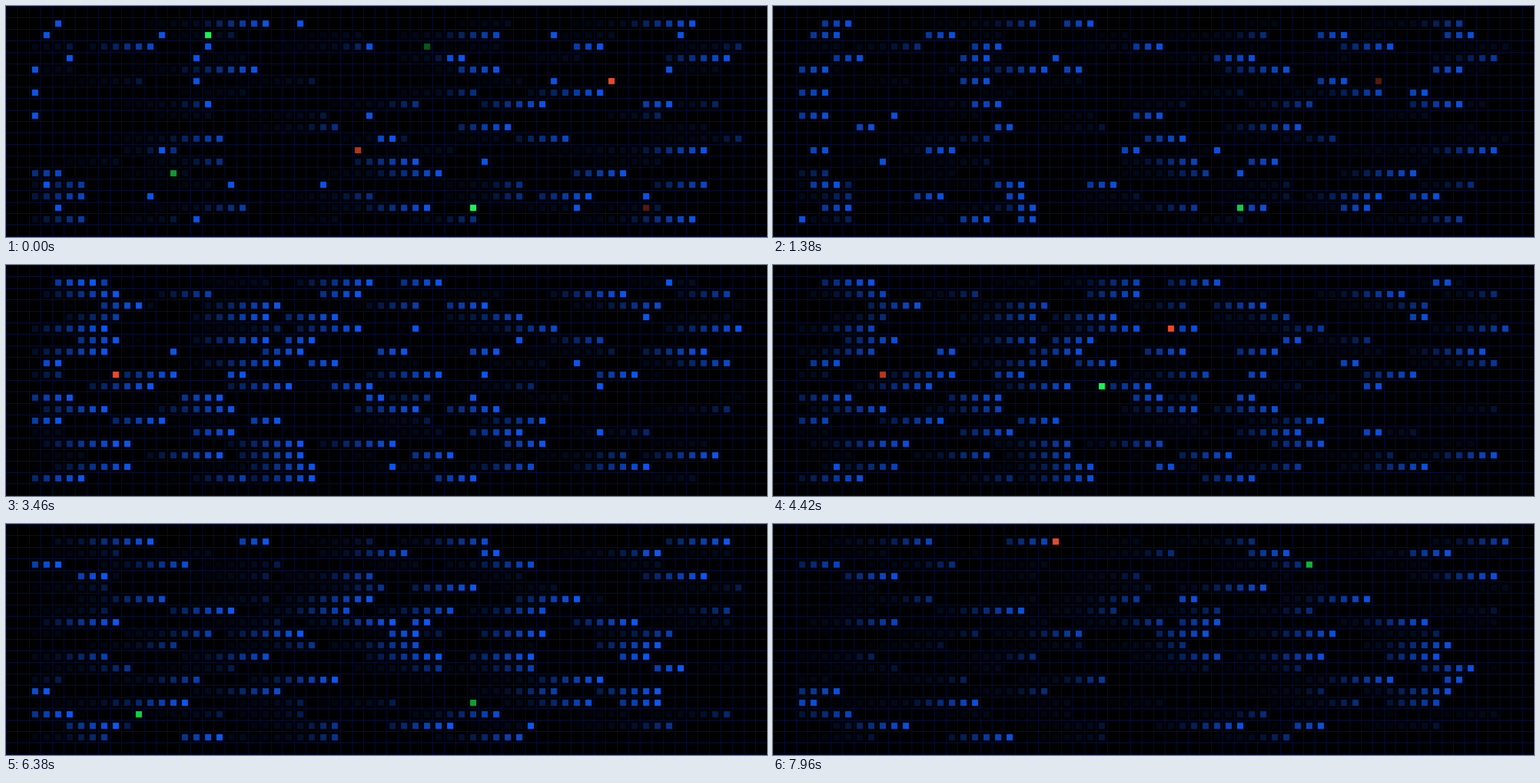
Write an HTML page with a canvas that moves like this. It is 1280 px wide and 389 px high and loops after 8 s.

```html
<!DOCTYPE html>
<html lang="en">
<head>
<meta charset="utf-8">
<title>Signal grid</title>
<style>
html, body { margin: 0; width: 100%; height: 100%; overflow: hidden; background: #000; }
canvas { display: block; width: 1280px; height: 389px; }
</style>
</head>
<body>
<canvas id="stage" width="1280" height="389"></canvas>
<script>
const ctx = document.getElementById('stage').getContext('2d');
const W = 1280, H = 389, LOOP = 8000;
const PITCH = 19.39, SIZE = 10.4;
const TICK = 600, LEAD = 300;
const FIRST = 2, LAST = 63;
const BLUE = '#0b59f8', GREEN = '#14f556', RED = '#ec4829';

// Main trails per row: [last column, tick at which the head gets there].
const mainTrails = [
  [[22, 0], [8, 4], [31, 6], [41, 10], [59, 0]],
  [[9, 6], [17, 4], [34, 10], [54, 7], [62, 4]],
  [[15, 10], [23, 6], [35, 4], [45, 10]],
  [[9, 4], [22, 6], [31, 9], [62, 13]],
  [[8, 6], [32, 8], [42, 13], [63, 6]],
  [[13, 10], [22, 6], [31, 11], [51, 4]],
  [[8, 6], [21, 13], [29, 10], [62, 8]],
  [[10, 12], [23, 6], [33, 11], [56, 13]],
  [[17, 9], [26, 12], [37, 6], [48, 13]],
  [[14, 8], [26, 8], [35, 10], [58, 13]],
  [[8, 9], [22, 10], [38, 12], [47, 13]],
  [[10, 8], [19, 6], [37, 8], [45, 9]],
  [[16, 9], [28, 11], [45, 4], [53, 13]],
  [[23, 10], [37, 0], [47, 9], [58, 13]],
  [[9, 6], [25, 6], [33, 6], [50, 10]],
  [[6, 12], [18, 6], [42, 10], [62, 7]],
  [[10, 6], [28, 8], [45, 5], [40, 13]],
  [[20, 4], [28, 8], [44, 10], [59, 0]]
];

// Single flashes: colour, row, column, start in ms.
const PULSE = 2200;
const pulses = [
  [GREEN, 2, 17, -1200], [GREEN, 3, 36, -1890], [GREEN, 14, 14, -1650], [GREEN, 17, 40, -80],
  [RED, 6, 52, -510], [RED, 12, 30, -1540], [RED, 17, 55, -1890],
  [RED, 9, 9, 2900], [RED, 5, 34, 4050], [GREEN, 10, 28, 3880],
  [GREEN, 16, 11, 4930], [GREEN, 15, 40, 4750],
  [RED, 1, 24, 6700], [GREEN, 3, 46, 6400]
];

let seed = 71;
function random() {
  seed = (seed * 16807) % 2147483647;
  return seed / 2147483647;
}
const between = (a, b) => a + Math.floor(random() * (b - a + 1));

function clashes(a, b) {
  return a.start <= b.end + 1 && b.start <= a.end + 1 && Math.abs(a.tick - b.tick) < 8;
}

// Background trails fill the gaps that the main ones leave in a row.
function buildRow(list, index) {
  const trails = list.map(([end, tick]) => {
    const cells = tick === 0 ? 11 : Math.min(8, tick + 1);
    return { row: index + 1, start: Math.max(FIRST, end - cells + 1), end, tick };
  });
  for (let i = 0; i < 26; i++) {
    const end = between(FIRST + 2, LAST);
    const trail = {
      row: index + 1,
      start: Math.max(FIRST, end - between(4, 9)),
      end,
      tick: between(-7, 16)
    };
    if (!trails.some(other => clashes(trail, other))) trails.push(trail);
  }
  return trails;
}
const trails = mainTrails.flatMap(buildRow);

// Steady fade to a dim glow, which then dies away slowly.
function glow(age) {
  if (age < 0) return 0;
  if (age < 6.5) return 1 - 0.135 * age;
  return Math.max(0, 0.12 * (1 - (age - 6.5) / 7));
}

function cell(row, col, color, alpha) {
  if (alpha <= 0) return;
  ctx.globalAlpha = Math.min(1, alpha);
  ctx.fillStyle = color;
  ctx.fillRect((col + 0.525) * PITCH - SIZE / 2, (row + 0.525) * PITCH - SIZE / 2, SIZE, SIZE);
}

function drawGrid() {
  ctx.globalAlpha = 1;
  ctx.fillStyle = '#000';
  ctx.fillRect(0, 0, W, H);
  ctx.fillStyle = '#020d3e';
  for (let i = 0; i <= 66; i++) ctx.fillRect(Math.round(i * PITCH), 0, 1, H);
  ctx.fillStyle = '#021248';
  for (let i = 0; i <= 20; i++) ctx.fillRect(0, Math.round(i * PITCH), W, 1);
}

function draw(ms) {
  drawGrid();
  const now = (ms + LEAD) / TICK;
  for (const { row, start, end, tick } of trails) {
    for (let col = start; col <= end; col++) {
      cell(row, col, BLUE, glow(now - (tick - (end - col))));
    }
  }
  for (const [color, row, col, birth] of pulses) {
    const p = (ms - birth) / PULSE;
    if (p >= 0 && p < 1) {
      cell(row, col, '#000', 1);
      cell(row, col, color, (1 - p) * 2.5);
    }
  }
}

const began = performance.now();
function loop() {
  draw((performance.now() - began) % LOOP);
  requestAnimationFrame(loop);
}
loop();
</script>
</body>
</html>
```
